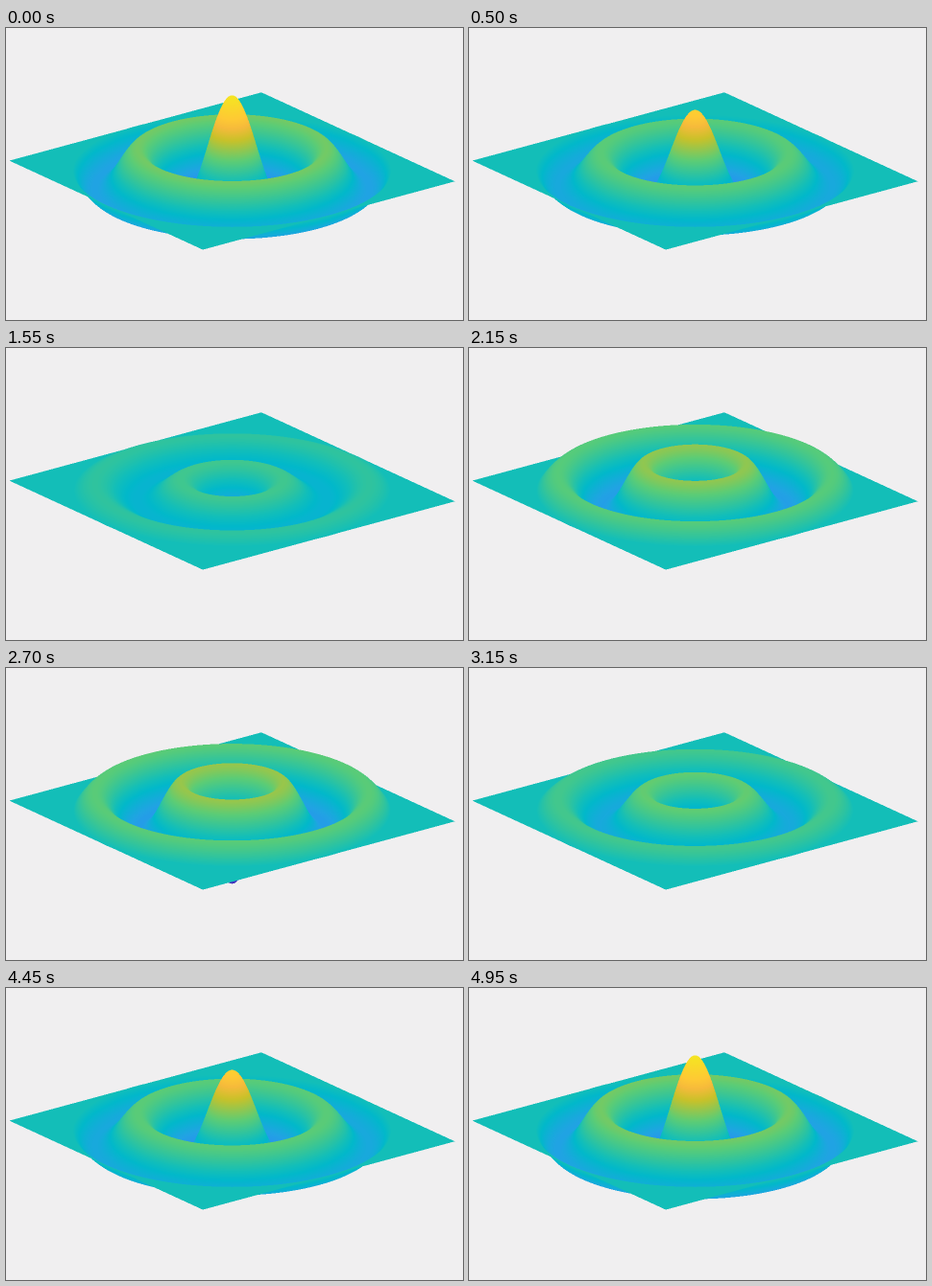
Write a matplotlib script that moves like this. It is 476x305 px and loops after 5 s.

```python
"""Vibrating circular membrane: fourth radially symmetric Bessel mode."""
import numpy as np
import matplotlib.pyplot as plt
from matplotlib.animation import FuncAnimation
from matplotlib.colors import LinearSegmentedColormap

W, H, DPI = 476, 305, 100
FRAMES, INTERVAL = 100, 50
SS = 2                           # supersampling per axis
CX, CY = 235.5, 149.4            # screen centre of the membrane
RX, RY, RZ = 165.5, 58.6, 78.5   # pixels per unit across, in depth, in height
AZIMUTH = np.radians(37.5)
K = 11.7915                      # fourth zero of J0
DEPTH_STEPS = 2400
BACKGROUND = (240, 239, 240)
EMPTY = 256                      # palette index of the background

# Height -1..1 runs from violet through teal to yellow
cmap = LinearSegmentedColormap.from_list("membrane", [
    (0, "#3e26a8"), (.125, "#484df0"), (.25, "#347afd"), (.375, "#21a3e3"),
    (.46, "#01b8ca"), (.5, "#12beb9"), (.625, "#5ccc75"), (.75, "#c8c129"),
    (.82, "#f5ba3b"), (.875, "#fec934"), (1, "#f5e422")])
palette = np.vstack([cmap(np.arange(256))[:, :3] * 255, BACKGROUND])
palette = palette.astype(np.float32)


def bessel_j0(x):
    """J0 from its integral form, by the midpoint rule."""
    theta = (np.arange(64) + 0.5) * np.pi / 64
    return np.cos(np.outer(x, np.sin(theta))).mean(axis=1)


def colour_index(z):
    return ((z + 1) * 127.5 + 0.5).astype(np.int16)


# Flat square plate: all of it, and the part in front of the disc
u = ((np.arange(W * SS) + 0.5) / SS - CX) / RX
v = (((np.arange(H * SS) + 0.5) / SS - CY) / RY)[:, None]
p = u * np.cos(AZIMUTH) - v * np.sin(AZIMUTH)
q = u * np.sin(AZIMUTH) + v * np.cos(AZIMUTH)
plate = (abs(p) <= 1) & (abs(q) <= 1)
front = plate & (v > 0) & (u**2 + v**2 > 1)
level = colour_index(np.float32(0))

# Disc samples, ordered from back to front in each pixel column
cols = np.flatnonzero(abs(u) < 1)
ud = u[cols]
vd = np.linspace(-1, 1, DEPTH_STEPS)[:, None] * np.sqrt(1 - ud**2)
radii = np.linspace(0, 1, 2000)
shape = np.interp(np.hypot(ud, vd), radii, bessel_j0(K * radii))
shape = shape.astype(np.float32)
base_row = ((CY + RY * vd) * SS).astype(np.float32)


def render(amplitude):
    canvas = np.full((H * SS, W * SS), EMPTY, np.int16)
    canvas[plate] = level
    z = shape * np.float32(amplitude)
    rows = (base_row - np.float32(RZ * SS) * z).astype(np.int32)
    # later (nearer) samples overwrite earlier ones
    canvas.ravel()[(rows * (W * SS) + cols).ravel()] = colour_index(z).ravel()
    canvas[front] = level
    rgb = palette[canvas].reshape(H, SS, W, SS, 3).mean(axis=(1, 3))
    return (rgb + 0.5).astype(np.uint8)


# The swing is symmetric in time, so half of the poses are enough
poses = [render(np.cos(2 * np.pi * k / (FRAMES - 1)))
         for k in range(FRAMES // 2)]

fig = plt.figure(figsize=(W / DPI, H / DPI), dpi=DPI)
ax = fig.add_axes([0, 0, 1, 1])
ax.axis("off")
picture = ax.imshow(poses[0], interpolation="nearest", aspect="auto")


def update(k):
    picture.set_data(poses[min(k, FRAMES - 1 - k)])
    return (picture,)


anim = FuncAnimation(fig, update, frames=FRAMES, interval=INTERVAL,
                     repeat=True, repeat_delay=0)
plt.show()
```
